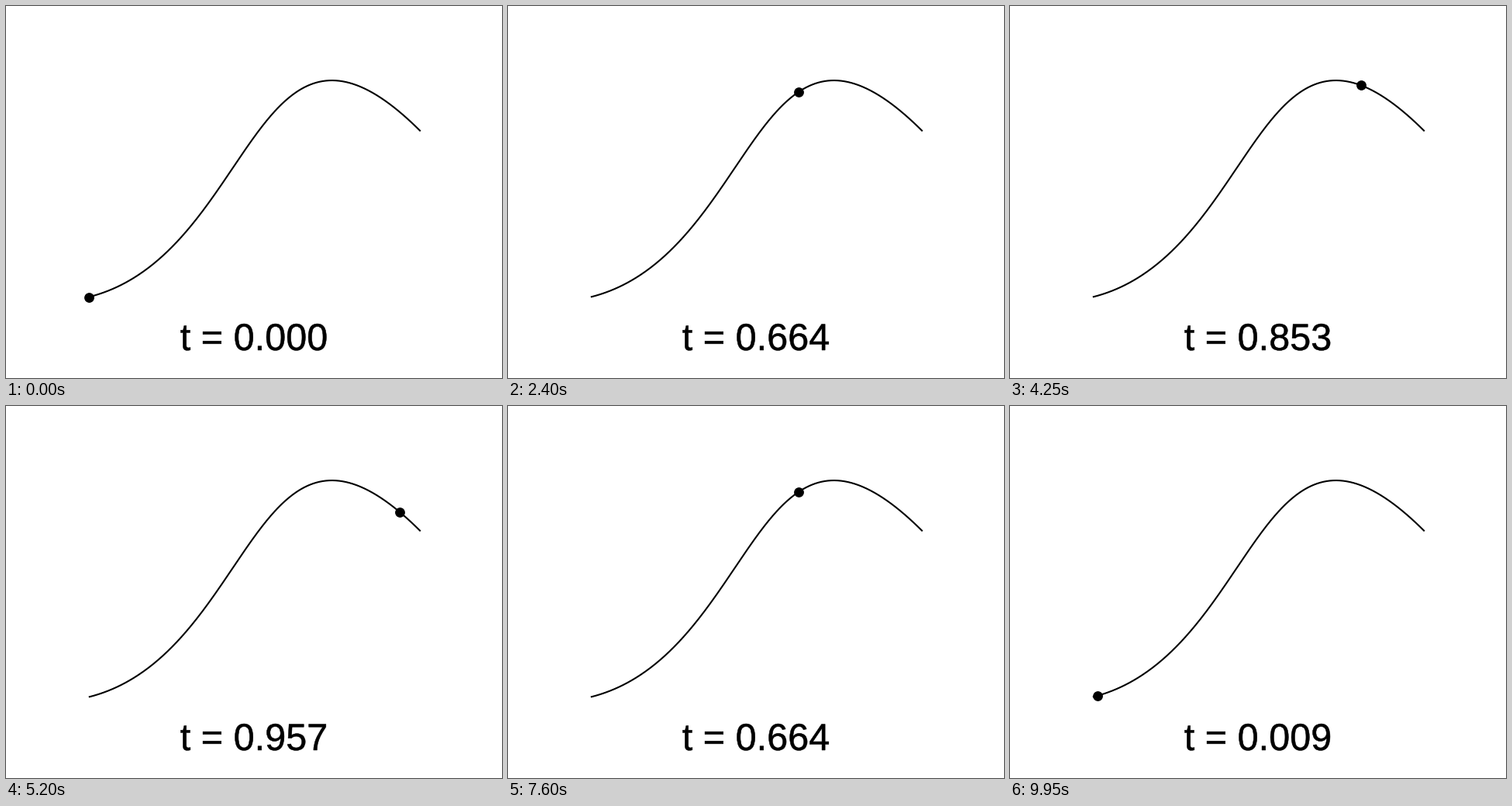
A matplotlib script for the animation above (10 s loop, 640x480 px).

```python
import math

import numpy as np
import matplotlib.pyplot as plt
from matplotlib.animation import FuncAnimation
from matplotlib.patheffects import Stroke

W, H, DPI = 640, 480, 100
FRAMES, INTERVAL = 200, 50
HALF = FRAMES // 2

UNIT = 53.5                # pixels per curve unit
X0, Y0 = 106.8, 375.5      # pixel position of the curve's start
CTRL = np.array([(0, 0), (4, 1), (4, 8), (8, 4)], float)
BRAKING = 2.815            # how strongly curvature slows the dot


def bezier(t):
    """Pixel position on the cubic Bezier curve."""
    t = np.asarray(t, float)
    u = 1 - t
    basis = np.stack([u**3, 3 * u * u * t, 3 * u * t * t, t**3], axis=-1)
    x, y = (basis @ CTRL).T
    return X0 + UNIT * x, Y0 - UNIT * y


D1 = 3 * np.diff(CTRL, axis=0)
D2 = 2 * np.diff(D1, axis=0)


def rate(t):
    """Parameter speed: the dot slows exponentially with curvature."""
    u = 1 - t
    dx, dy = u * u * D1[0] + 2 * u * t * D1[1] + t * t * D1[2]
    ax, ay = u * D2[0] + t * D2[1]
    speed = math.hypot(dx, dy)
    curvature = abs(dx * ay - dy * ax) / speed**3
    return math.exp(-BRAKING * curvature) / speed


def walk_back(step):
    """Parameters of one pass, stepped from the end of the curve to its start."""
    ts = [1.0]
    for _ in range(HALF):
        ts.append(ts[-1] - step * rate(max(ts[-1], 0.0)))
    return ts[::-1]


def timed_pass():
    """Find the step size that makes the pass start exactly at zero."""
    lo, hi = 0.1, 0.5
    for _ in range(40):
        mid = (lo + hi) / 2
        if walk_back(mid)[0] > 0:
            lo = mid
        else:
            hi = mid
    ts = walk_back(lo)
    ts[0] = 0.0
    return ts


pass_ts = timed_pass()

fig = plt.figure(figsize=(W / DPI, H / DPI), dpi=DPI, facecolor="white")
ax = fig.add_axes([0, 0, 1, 1])
ax.set_xlim(0, W)
ax.set_ylim(H, 0)
ax.axis("off")

ax.plot(*bezier(np.linspace(0, 1, 300)), color="black", lw=1.5,
        solid_capstyle="butt")
dot, = ax.plot([], [], "o", color="black", ms=8.2)
# The outline draws the glyphs as unhinted paths with a slightly heavier weight.
label = ax.text(224.7, 444, "", fontsize=35, family="Liberation Sans",
                color="black", ha="left", va="baseline",
                path_effects=[Stroke(linewidth=0.4, foreground="black")])


def draw(frame):
    t = pass_ts[HALF - abs(HALF - frame % FRAMES)]
    x, y = bezier(t)
    dot.set_data([x], [y])
    label.set_text(f"t = {t:.3f}")
    return dot, label


anim = FuncAnimation(fig, draw, frames=FRAMES, interval=INTERVAL,
                     init_func=lambda: draw(0), repeat=True, repeat_delay=0)
plt.show()
```
